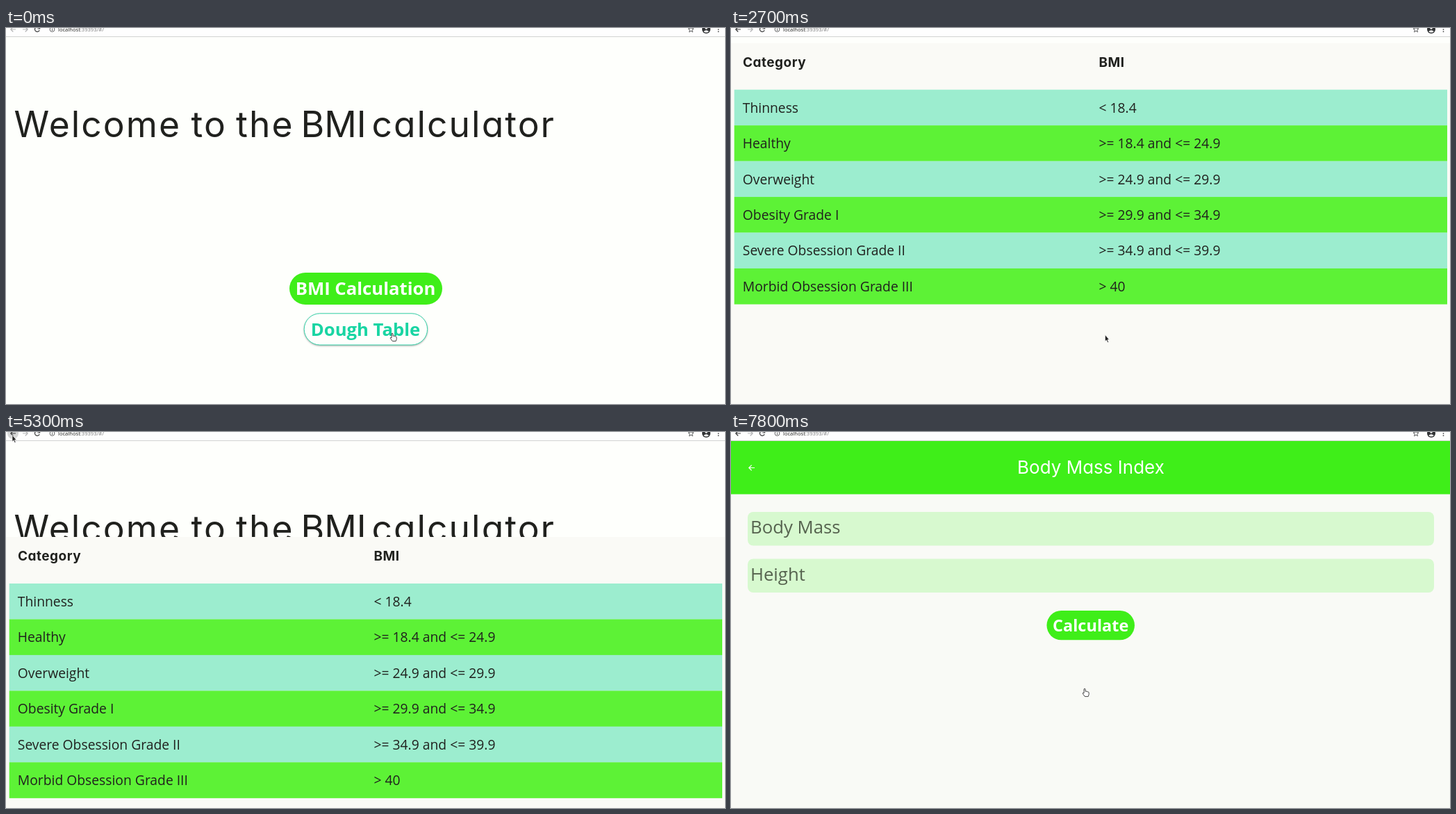
Write an HTML page that moves like this. It is 1035 by 541 pixels and loops after 8000 ms.

```html
<!DOCTYPE html>
<html lang="en">
<head>
<meta charset="utf-8">
<title>BMI calculator</title>
<style>
html, body { margin: 0; width: 100%; height: 100%; overflow: hidden; background: #fefffc; }
svg { display: block; }
text { font-family: "Open Sans", sans-serif; fill: #20211e; }
.geo { font-family: Inter, sans-serif; font-feature-settings: "cv11"; }
.title { font-size: 51.5px; letter-spacing: .04em; }
.head { font-size: 19px; font-weight: 700; letter-spacing: .025em; }
.cell { font-size: 19.3px; }
.label { font-size: 25.7px; font-weight: 700; text-anchor: middle; }
.field { font-size: 25.7px; fill: #56634f; }
.line { fill: none; stroke: #3c3d3e; stroke-width: 1.2; }
.hover { filter: drop-shadow(0 1.2px 1px rgba(0, 0, 0, .33)); }
</style>
</head>
<body>
<svg width="1035" height="541" viewBox="0 0 1035 541">
  <defs>
    <clipPath id="pill"><rect x="408" y="352" width="220" height="46" rx="23"/></clipPath>
  </defs>

  <g id="home">
    <rect width="1035" height="541" fill="#fefffc"/>
    <text class="geo title" y="157"><tspan x="11.5">Welcome</tspan> <tspan x="266.5">to</tspan> <tspan x="331">the</tspan> <tspan x="424.5" letter-spacing="0" style="letter-spacing:0">BMI</tspan> <tspan x="526.5">calculator</tspan></text>
    <rect id="calcButton" x="408" y="352" width="220" height="46" rx="23"/>
    <circle id="ripple" cy="375" fill="#fff" fill-opacity=".12" clip-path="url(#pill)"/>
    <text class="label" x="517.5" y="384" style="fill:#fff">BMI Calculation</text>
    <rect id="tableButton" x="429.2" y="410.8" width="177.4" height="45.2" rx="22.6" fill="#fefffc" stroke="#35d3a9"/>
    <text class="label" x="517.5" y="442.5" style="fill:#19d5a3">Dough Table</text>
  </g>

  <g id="table">
    <rect y="13" width="1035" height="541" fill="#fafaf6"/>
    <text class="geo head" x="17" y="47">Category</text>
    <text class="geo head" x="529.5" y="47">BMI</text>
  </g>

  <g id="form">
    <rect y="13" width="1035" height="528" fill="#f9faf6"/>
    <rect y="13" width="1035" height="76.5" fill="#3fee19"/>
    <path d="M34 51.5H26M29.7 47.6L25.8 51.5L29.7 55.4" class="line" style="stroke:#fff"/>
    <text class="geo" x="518" y="60" font-size="26" text-anchor="middle" style="fill:#fff">Body Mass Index</text>
    <rect x="24" y="115" width="988" height="48.5" rx="8" fill="#d7f9cf"/>
    <text class="field" x="28" y="146">Body Mass</text>
    <rect x="24" y="182.5" width="988" height="48.5" rx="8" fill="#d7f9cf"/>
    <text class="field" x="28" y="214">Height</text>
    <rect x="454.5" y="257" width="126.5" height="42.3" rx="21" fill="#3fee19"/>
    <text class="label" x="517.7" y="287" style="fill:#fff;font-size:23.5px">Calculate</text>
  </g>

  <g id="browser">
    <rect width="1035" height="12" fill="#fefefe"/>
    <rect y="12" width="1035" height="1" fill="#d2d3d2"/>
    <circle id="backHalo" cx="10" cy="2" r="8"/>
    <path id="back" d="M14 2H7M10.3 -1.5L6.8 2L10.3 5.5" class="line"/>
    <path d="M24 2H31M27.7 -1.5L31.2 2L27.7 5.5" class="line" style="stroke:#b4b5b6"/>
    <path d="M47.8 -.2A3.5 3.5 0 1 0 48.2 3.3M48.6 -2V1H45.5" class="line"/>
    <circle cx="66.5" cy="2" r="3.4" class="line" style="stroke-width:.8"/>
    <path d="M66.5 1.5V4M66.5 0V.7" class="line" style="stroke-width:.9"/>
    <text x="75" y="5" font-size="7.6">localhost<tspan fill="#7c7d7e">:39393/#/</tspan></text>
    <path d="M986 -2L987.1 .9L990 1L987.7 2.9L988.5 5.8L986 4.2L983.5 5.8L984.3 2.9L982 1L984.9 .9Z" class="line" style="stroke-width:.8"/>
    <circle cx="1008" cy="2" r="6" fill="#303234"/>
    <circle cx="1008" cy="0" r="1.8" fill="#fff"/>
    <path d="M1004.2 5Q1008 1.4 1011.8 5Q1008 8 1004.2 5" fill="#fff"/>
    <path d="M1025.5 -1.6v1.5M1025.5 1.6v1.5M1025.5 4.6v1.5" class="line" style="stroke-width:1.5"/>
  </g>

  <g id="cursor" stroke-linejoin="round">
    <path id="arrow" d="M0 0V9.2L2 7.4L3.6 11L5 10.3L3.5 6.9H6Z" fill="#222" stroke="#fff" stroke-width=".6"/>
    <path id="hand" d="M-.9 .9Q.1 -.6 1.1 .9V4.2Q2.1 3.6 3 4.4Q4 3.9 4.7 4.9Q6.2 4.7 6.2 6.3V8.7L5.2 11.6H.3L-2.7 7.4Q-3 5.6 -.9 6.8Z" fill="#fff" stroke="#333" stroke-width=".9"/>
  </g>
</svg>
<script>
const $ = id => document.getElementById(id);
const LOOP = 8000, STEP = 100;

function add(parent, tag, attrs, text = "") {
  const el = document.createElementNS("http://www.w3.org/2000/svg", tag);
  for (const name in attrs) el.setAttribute(name, attrs[name]);
  el.textContent = text;
  parent.append(el);
}

[
  ["Thinness", "< 18.4"],
  ["Healthy", ">= 18.4 and <= 24.9"],
  ["Overweight", ">= 24.9 and <= 29.9"],
  ["Obesity Grade I", ">= 29.9 and <= 34.9"],
  ["Severe Obsession Grade II", ">= 34.9 and <= 39.9"],
  ["Morbid Obsession Grade III", "> 40"],
].forEach(([category, range], i) => {
  const y = 80 + i * 51.45;
  add($("table"), "rect", { x: 4.7, y, width: 1026.3, height: 51.6, fill: i % 2 ? "#5df236" : "#9cedcf" });
  add($("table"), "text", { class: "cell", x: 16.8, y: y + 33 }, category);
  add($("table"), "text", { class: "cell", x: 529.5, y: y + 33 }, range);
});

// Pointer tip: time, x, y
const path = [
  [0, 556, 439], [600, 556, 439], [800, 551, 410], [1000, 544, 376], [1200, 543, 380],
  [1400, 549, 428], [1500, 551, 446], [1800, 546, 437], [2100, 538.5, 441], [3100, 538.5, 442],
  [3400, 440, 320], [3800, 258.5, 77], [4000, 258.5, 77], [4100, 101.5, 54], [4200, 101.5, 54],
  [4500, 9, 8], [4600, 9, 8], [4900, 9, 4.5], [5300, 9, 4.5], [5400, 286, 276], [5500, 286, 276],
  [5600, 311, 295], [5700, 311, 295], [5900, 426, 377], [6000, 426, 377], [6300, 509, 357],
  [6400, 509, 357], [6700, 509, 369], [LOOP, 509, 369],
];

function pointerAt(t) {
  const i = path.findIndex(p => p[0] > t);
  const [t0, x0, y0] = path[i - 1], [t1, x1, y1] = path[i];
  const k = (t - t0) / (t1 - t0);
  return [x0 + (x1 - x0) * k, y0 + (y1 - y0) * k];
}

// Distance of the table page below its resting place
function tableOffset(t) {
  if (t < 2700) return 138;
  if (t < 2800) return 8.7;
  if (t < 5200) return 0;
  return t < 5300 ? 8.7 : 138;
}

const show = (id, on) => $(id).setAttribute("visibility", on ? "visible" : "hidden");

function draw(now) {
  const t = Math.floor(now % LOOP / STEP) * STEP;
  const [x, y] = pointerAt(t);
  const onTable = t >= 2600 && t < 5400, onForm = t >= 7800;
  const within = (left, top, right, bottom) =>
    !onTable && !onForm && x > left && x < right && y > top && y < bottom;
  const overCalc = within(408, 352, 628, 398), overTable = within(429, 410, 607, 457);

  show("table", onTable);
  $("table").setAttribute("transform", `translate(0 ${tableOffset(t)})`);
  show("form", onForm);

  $("calcButton").setAttribute("fill", overCalc ? "#55f031" : "#3fee19");
  $("calcButton").classList.toggle("hover", overCalc);
  $("tableButton").classList.toggle("hover", overTable);
  show("ripple", t >= 6900 && !onForm);
  $("ripple").setAttribute("cx", t < 7300 ? 528 : 533);
  $("ripple").setAttribute("r", t < 7300 ? 56 : 63);

  $("back").style.stroke = t < 2500 ? "#b4b5b6" : "#3c3d3e";
  show("backHalo", t >= 4500 && t < 5400);
  $("backHalo").setAttribute("fill", t < 5200 ? "#e6e7e7" : "#d6d7d7");

  const hand = overCalc || overTable || onForm;
  show("hand", hand);
  show("arrow", !hand);
  $("cursor").setAttribute("transform", `translate(${x} ${y})`);
  requestAnimationFrame(() => draw(performance.now()));
}
draw(performance.now());
</script>
</body>
</html>
```
